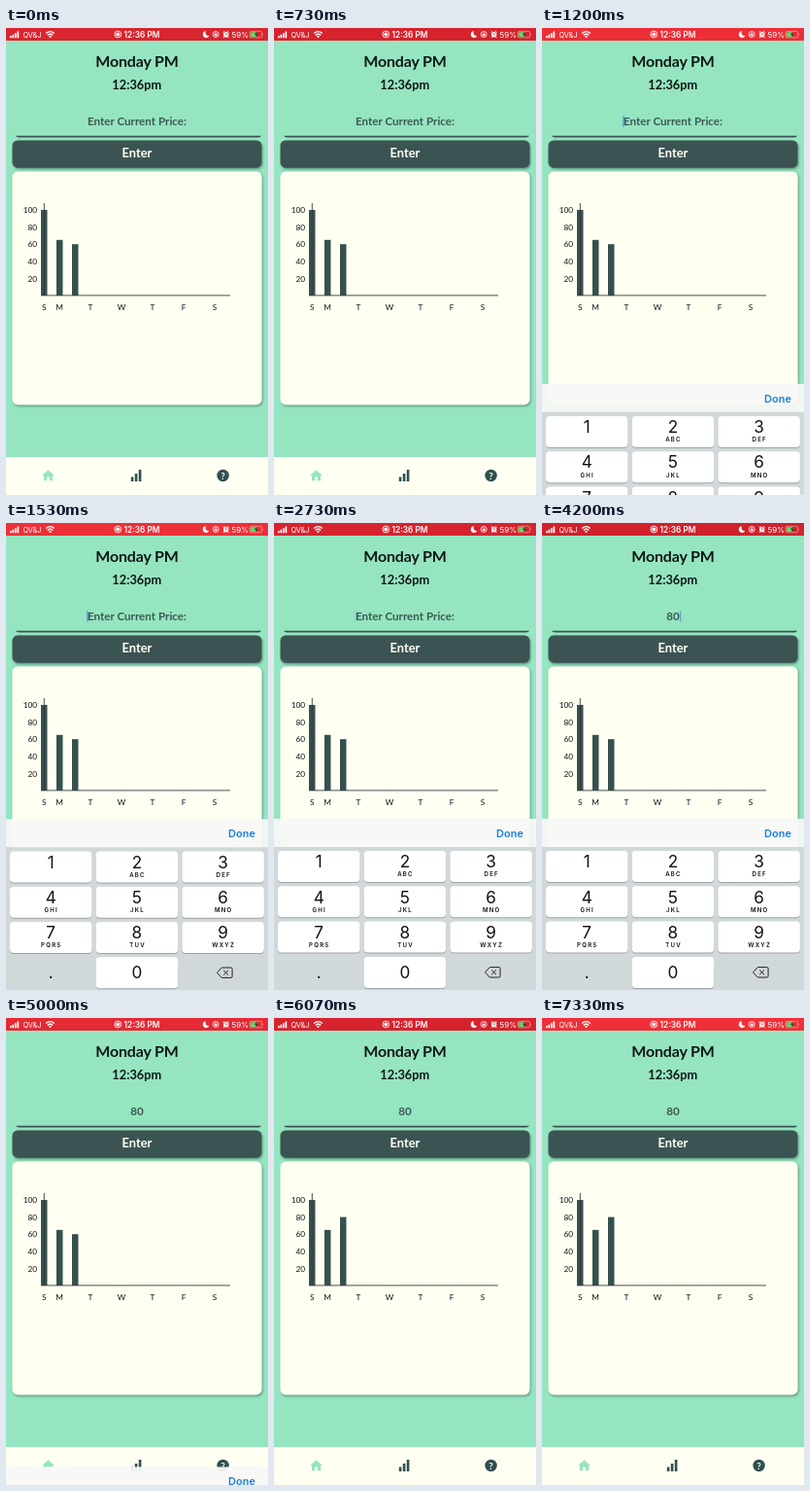
Animation of 270 by 480 pixels, one loop 7.39 s. Source, as an HTML page:

```html
<!DOCTYPE html>
<html lang="en">
<head>
<meta charset="utf-8">
<title>Price tracker</title>
<style>
  html, body { margin: 0; width: 100%; height: 100%; overflow: hidden; background: #95e5c0; }
  svg { display: block; width: 100%; height: 100%; }
  text { font-family: Lato, "Open Sans", sans-serif; }
  .sys text { font-family: Inter, Roboto, sans-serif; }
  .mid { text-anchor: middle; }
  .end { text-anchor: end; }
  .bold { font-weight: 700; }
  .axis { font-size: 8.3px; fill: #111818; }
  .digit { font-size: 17.2px; }
  .sub { font-size: 6.1px; font-weight: 600; letter-spacing: 1.2px; }
  .field { font-size: 11.65px; font-weight: 700; fill: #3d5954; }
</style>
</head>
<body>
<svg viewBox="0 0 270 480" preserveAspectRatio="none">
  <defs>
    <filter id="shade" x="-5%" y="-10%" width="110%" height="130%">
      <feDropShadow dx="1" dy="1.5" stdDeviation="0.8" flood-color="#2f4f4f" flood-opacity=".55"/>
    </filter>
  </defs>
  <rect width="270" height="480" fill="#95e5c0"/>

  <!-- status bar -->
  <g class="sys" fill="#fff">
    <rect id="status" width="270" height="13"/>
    <path d="M4 8h1.7v2.2H4zM6.5 6.8h1.7v3.4H6.5zM9 5.2h1.7v5H9zM11.5 3.5h1.7v6.7h-1.7z"/>
    <text x="17.5" y="9.6" font-size="7.3">QV&amp;J</text>
    <path d="M41.2 5.6Q45.5 1.6 49.8 5.6M42.8 7.5Q45.5 5 48.2 7.5" fill="none" stroke="#fff" stroke-width="1.3"/>
    <path d="M44 8.7Q45.5 7.5 47 8.7L45.5 10.3z"/>
    <circle cx="115.3" cy="6.5" r="3.4" fill="none" stroke="#fff" stroke-width=".9"/>
    <circle cx="115.3" cy="6.5" r="2"/>
    <text x="121.5" y="9.5" font-size="8.3" font-weight="600">12:36 PM</text>
    <path d="M206 3.2A3.4 3.4 0 1 0 209.3 8A3.2 3.2 0 0 1 206 3.2z"/>
    <circle cx="216.2" cy="6.5" r="3" fill="none" stroke="#fff" stroke-width=".8"/>
    <path d="M214.8 6h2.8v2.2h-2.8z"/>
    <path d="M215.4 6v-.6a.8.8 0 0 1 1.6 0v.6" fill="none" stroke="#fff" stroke-width=".5"/>
    <circle cx="226.7" cy="6.8" r="2.7"/>
    <path d="M223.8 4.6l1.5-1.5M229.6 4.6l-1.5-1.5M224.8 9l-.8 1M228.6 9l.8 1" stroke="#fff" stroke-width=".9"/>
    <path d="M226.7 5v2h1.5" fill="none" stroke="#e02a35" stroke-width=".7"/>
    <text x="232.6" y="9.6" font-size="8">59%</text>
    <rect x="251.2" y="3.4" width="12.6" height="6.4" rx="1.6" fill="none" stroke="#fff" stroke-opacity=".6" stroke-width=".7"/>
    <rect x="252.1" y="4.3" width="6.4" height="4.6" rx=".8" fill="#63d866"/>
    <path d="M264.4 5.4q1.2 1.2 0 2.4z" fill-opacity=".6"/>
    <path d="M258.6 3.6l-2.4 3.5h1.7l-.7 2.6 2.5-3.5h-1.7z" fill="#222"/>
  </g>

  <!-- header and form -->
  <g class="mid">
    <text class="bold" x="135" y="39.8" font-size="16" letter-spacing="-.15" fill="#101817">Monday PM</text>
    <text class="bold" x="134.8" y="63" font-size="12.8" fill="#101817">12:36pm</text>
    <text class="field" id="field" x="135" y="100"></text>
  </g>
  <rect id="caret" x="0" y="90.5" width="1.2" height="11" fill="#4778e8"/>
  <path d="M10 110.8H263q-.5 1.6-3 1.6H13.5q-2.8 0-3.5-1.6z" fill="#3a5252"/>
  <rect x="6.5" y="115.5" width="257" height="28.2" rx="5.5" fill="#3a5252" filter="url(#shade)"/>
  <text class="mid bold" x="135" y="132.6" font-size="12.9" fill="#fffff2">Enter</text>

  <!-- chart card -->
  <rect x="6.5" y="147.6" width="257" height="239.6" rx="5.5" fill="#fffff2" filter="url(#shade)"/>
  <g id="chart" fill="#365050"></g>
  <path d="M39.3 180V275M36 274.9H231" stroke="#343d3c" stroke-width=".9"/>

  <!-- tab bar -->
  <rect y="441" width="270" height="39" fill="#fffff2"/>
  <path d="M43.5 454.3l6.3 5.8h-1.8v5.2h-3.1v-3.7h-2.8v3.7H39v-5.2h-1.8z" fill="#95e5c0"/>
  <path d="M128.8 461.5h2.6v4.5h-2.6zM132.8 458h2.6v8h-2.6zM136.8 454h2.6v12h-2.6z" fill="#2f4f4f"/>
  <circle cx="223.6" cy="460" r="6.2" fill="#2f4f4f"/>
  <text class="mid bold" x="223.6" y="463.6" font-size="10" fill="#fffff2">?</text>

  <!-- keyboard, drawn from its own top edge -->
  <g id="pad" class="sys">
    <rect width="270" height="29" fill="#f8f9f7" fill-opacity=".94"/>
    <text class="end" x="257" y="18.6" font-size="11" font-weight="600" fill="#1a80e0">Done</text>
    <rect y="29" width="270" height="149" fill="#d1d8da"/>
    <g id="keys" class="mid" fill="#111"></g>
    <g fill="none" stroke="#222" stroke-linejoin="round">
      <path d="M217.5 157.8l4.8-5.2h9.6q1.2 0 1.2 1.2v8q0 1.2-1.2 1.2h-9.6z"/>
      <path d="M224.2 155.4l4.8 4.8M229 155.4l-4.8 4.8"/>
    </g>
  </g>
</svg>
<script>
const LOOP = 7390, STEP = 1000 / 15;
const OPEN = 1078, CLOSE = 4797, SAVE = 6050;
const PAD_TOP = 304, PAD_HIDDEN = 482;
const HINT = "Enter Current Price:";
const TYPED = [[0, HINT], [3300, "8"], [3630, "80"]];
const PULSE = 2000, DIMMEST = 400;
const DIM = [205, 31, 43], BRIGHT = [240, 48, 56];

const get = id => document.getElementById(id);
const field = get("field"), caret = get("caret"), pad = get("pad"), status_ = get("status");

function add(parent, tag, attrs, text = "") {
  const el = document.createElementNS("http://www.w3.org/2000/svg", tag);
  for (const name in attrs) el.setAttribute(name, attrs[name]);
  el.textContent = text;
  return parent.appendChild(el);
}

const chart = get("chart");
const bars = [0, 1, 2].map(i => add(chart, "rect", { x: 36 + i * 16, width: 6.5 }));
function setBar(bar, price) {
  bar.setAttribute("y", 275 - price * .88);
  bar.setAttribute("height", price * .88);
}
setBar(bars[0], 100);
setBar(bars[1], 65);
for (let n = 20; n <= 100; n += 20)
  add(chart, "text", { class: "axis end", x: 32.2, y: 278.1 - n * .88 }, n);
[..."SMTWTFS"].forEach((day, i) =>
  add(chart, "text", { class: "axis mid", x: i ? 23 + i * 32 : 39.3, y: 290 }, day));

const keys = get("keys");
function addKey(label, sub, col, row) {
  const x = 4 + col * 88.7, y = 33 + row * 36.3, mid = x + 42.2;
  if (label !== ".") {
    add(keys, "rect", { x, y: y + 1, width: 84.5, height: 32, rx: 4, fill: "#9da2a4" });
    add(keys, "rect", { x, y, width: 84.5, height: 32, rx: 4, fill: "#fff" });
  }
  add(keys, "text", { class: "digit", x: mid, y: y + (row === 3 ? 22 : 17.2) }, label);
  add(keys, "text", { class: "sub", x: mid + .6, y: y + 26.3 }, sub);
}
["", "ABC", "DEF", "GHI", "JKL", "MNO", "PQRS", "TUV", "WXYZ"]
  .forEach((sub, i) => addKey(i + 1, sub, i % 3, Math.floor(i / 3)));
addKey(".", "", 0, 3);
addKey("0", "", 1, 3);

// critically damped spring, 0 to 1
function spring(ms) {
  const w = Math.max(0, ms) * .01826;
  return 1 - (1 + w) * Math.exp(-w);
}

// solid, fade out, hidden, fade in, once a second
function blink(ms) {
  const p = ms % 1000 / 1000;
  if (p < .5) return 1;
  if (p < .7) return (.7 - p) / .2;
  return p < .85 ? 0 : (p - .85) / .15;
}

// recording bar breathing between two reds
function pulse(ms) {
  const k = .5 - .5 * Math.cos((ms - DIMMEST) / PULSE * 2 * Math.PI);
  return `rgb(${DIM.map((c, i) => Math.round(c + (BRIGHT[i] - c) * k))})`;
}

function draw(now) {
  const t = Math.floor((now % LOOP + 5) / STEP) * STEP;

  status_.setAttribute("fill", pulse(t));

  const shown = spring(t - OPEN) - spring(t - CLOSE);
  pad.setAttribute("transform", `translate(0 ${PAD_HIDDEN - (PAD_HIDDEN - PAD_TOP) * shown})`);

  const [since, value] = TYPED.filter(([start]) => t >= start).pop();
  if (field.textContent !== value) field.textContent = value;
  const half = field.getComputedTextLength() / 2;
  caret.setAttribute("x", value === HINT ? 134.5 - half : 135.3 + half);
  const focused = t >= OPEN && t < CLOSE;
  caret.setAttribute("opacity", focused ? blink(t - Math.max(OPEN, since)) : 0);

  setBar(bars[2], t < SAVE ? 60 : 80);
}

const begin = performance.now();
function tick() {
  draw(performance.now() - begin);
  requestAnimationFrame(tick);
}
tick();
</script>
</body>
</html>
```
